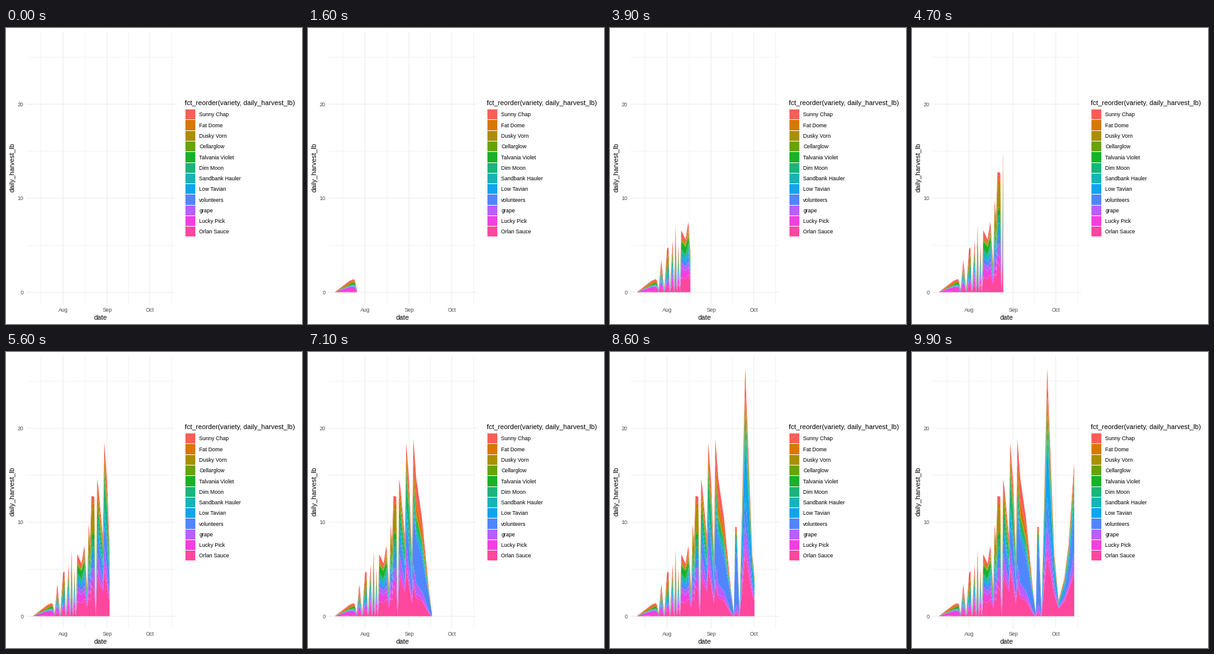
Write a matplotlib script that moves like this. It is 480 px wide and 480 px high and loops after 10000 ms.

```python
import numpy as np
import matplotlib.pyplot as plt
from matplotlib.animation import FuncAnimation
from matplotlib.patches import Polygon, Rectangle

SIZE, DPI = 480, 72
FRAMES, LAST_DAY = 100, 95
X0, DAY_W = 44.1, 2.305      # first day, pixels per day
Y0, LB_H = 428.5, 15.25      # zero line, pixels per pound
LEFT, RIGHT, TOP, BOTTOM = 33.2, 274, 5.8, 448
GREY = "#4D4D4D"

# Name, colour, usual share, seasonal bumps as (day, spread, extra share)
VARIETIES = [
    ("Sunny Chap", "#F95F57", 5, [(19, 9, 18), (58, 4, 14)]),
    ("Fat Dome", "#D77800", 4, [(10, 3, 22), (57, 4, 10)]),
    ("Dusky Vorn", "#A99000", 1, [(21, 2, 20), (41, 3, 18)]),
    ("Cellarglow", "#68A300", 2, []),
    ("Talvania Violet", "#18B12A", 4, [(13, 2, 26), (31, 5, 12)]),
    ("Dim Moon", "#1AB57A", 5, [(52, 2, 14)]),
    ("Sandbank Hauler", "#17B3B7", 4, [(23, 6, 14)]),
    ("Low Tavian", "#12A4EB", 5, [(18, 4, 12), (80, 8, 16)]),
    ("volunteers", "#5086FF", 8, [(60, 5, 40), (69, 3, 60), (95, 4, 26)]),
    ("grape", "#B95EFF", 9, []),
    ("Lucky Pick", "#F041DF", 3, [(10, 4, 60), (28, 8, 16)]),
    ("Orlan Sauce", "#FF479E", 24, [(69, 3, -20), (85, 5, 25)]),
]

# Turning points of the total (day, pounds) and days with almost no harvest
PEAKS = [
    (0, .05), (10, 1.2), (13, 1.4), (14, 1.2), (17, 3.4), (21, 4.6),
    (22, 4.8), (25, 5.5), (27, 7.1), (29, 5.1), (31, 6.6), (34, 5.6),
    (36, 7.5), (38, 3), (39, 9.8), (40, 8), (41, 12.8), (43, 12.7),
    (45, 14.6), (46, 13.5), (49, 8.5), (50, 18.5), (52, 14.3), (54, 6.5),
    (55, 18.9), (57, 14.7), (61, 10.5), (66, 2.8), (69, 9.5), (70, 9.5),
    (76, 26.4), (81, 6.6), (84, 1.7), (88, 4), (91, 7.6), (95, 16.3),
]
DIPS = [15, 19, 23, 26, 28, 30, 44, 68, 72]


def share_curve(days, base, bumps):
    curve = base * np.minimum(days / 30, 1) + .1
    for center, spread, extra in bumps:
        curve = curve + extra * np.exp(-((days - center) / spread) ** 2 / 2)
    return np.maximum(curve, 0)


def build_stack():
    """Days and cumulative pounds per layer, baseline first."""
    points = sorted(PEAKS + [(day, .3) for day in DIPS])
    days, total = np.array(points).T
    rng = np.random.default_rng(7)
    share = np.array([share_curve(days, base, bumps)
                      for _, _, base, bumps in reversed(VARIETIES)])
    share *= rng.uniform(.75, 1.25, share.shape)
    share *= total / share.sum(axis=0)
    return days, np.vstack([np.zeros_like(days), np.cumsum(share, axis=0)])


def day_x(day):
    return X0 + DAY_W * day


def lb_y(lb):
    return Y0 - LB_H * lb


plt.rcParams["font.family"] = "Liberation Sans"
fig = plt.figure(figsize=(SIZE / DPI, SIZE / DPI), dpi=DPI, facecolor="white")
ax = fig.add_axes([0, 0, 1, 1])
ax.set_xlim(0, SIZE)
ax.set_ylim(SIZE, 0)
ax.axis("off")


def grid_line(xs, ys, major):
    ax.plot(xs, ys, color="#EBEBEB", lw=1.07 if major else .6,
            solid_capstyle="butt", zorder=1, snap=False)


def label(x, y, text, size=8.8, color="black", **kw):
    ax.text(x, y, text, fontsize=size, color=color, **kw)


for lb in range(0, 30, 5):
    grid_line([LEFT, RIGHT], [lb_y(lb)] * 2, lb % 10 == 0)
    if lb % 10 == 0:
        label(28.4, lb_y(lb) + 3.1, str(lb), color=GREY, ha="right")
for day in (5.5, 36.5, 67, 97.5):
    grid_line([day_x(day)] * 2, [TOP, BOTTOM], False)
for day, month in ((21, "Aug"), (52, "Sep"), (82, "Oct")):
    grid_line([day_x(day)] * 2, [TOP, BOTTOM], True)
    label(day_x(day), 460, month, color=GREY, ha="center")

label(153.5, 473, "date", 11, ha="center")
label(13.5, 226, "daily_harvest_lb", 11, rotation=90,
      rotation_mode="anchor", ha="center")
label(290.5, 125, "fct_reorder(variety, daily_harvest_lb)", 11)

for i, (name, color, *_) in enumerate(VARIETIES):
    mid = 140.3 + 17.28 * i
    ax.add_patch(Rectangle((291, mid - 8.1), 16.2, 16.2, fc=color, lw=0))
    label(313.2, mid + 3.1, name)

DAYS, STACK = build_stack()
areas = [ax.add_patch(Polygon([(0, 0)] * 3, fc=color, lw=0, zorder=2))
         for _, color, *_ in reversed(VARIETIES)]


def update(frame):
    cut = LAST_DAY * frame / (FRAMES - 1)
    days = np.append(DAYS[DAYS < cut], cut)
    x = day_x(days)
    edges = [lb_y(np.interp(days, DAYS, layer)) for layer in STACK]
    for area, low, high in zip(areas, edges, edges[1:]):
        area.set_visible(frame > 0)
        area.set_xy(np.column_stack([np.append(x, x[::-1]),
                                     np.append(high, low[::-1])]))
    return areas


anim = FuncAnimation(fig, update, frames=FRAMES, interval=100,
                     repeat=True, repeat_delay=0, blit=False)
plt.show()
```
